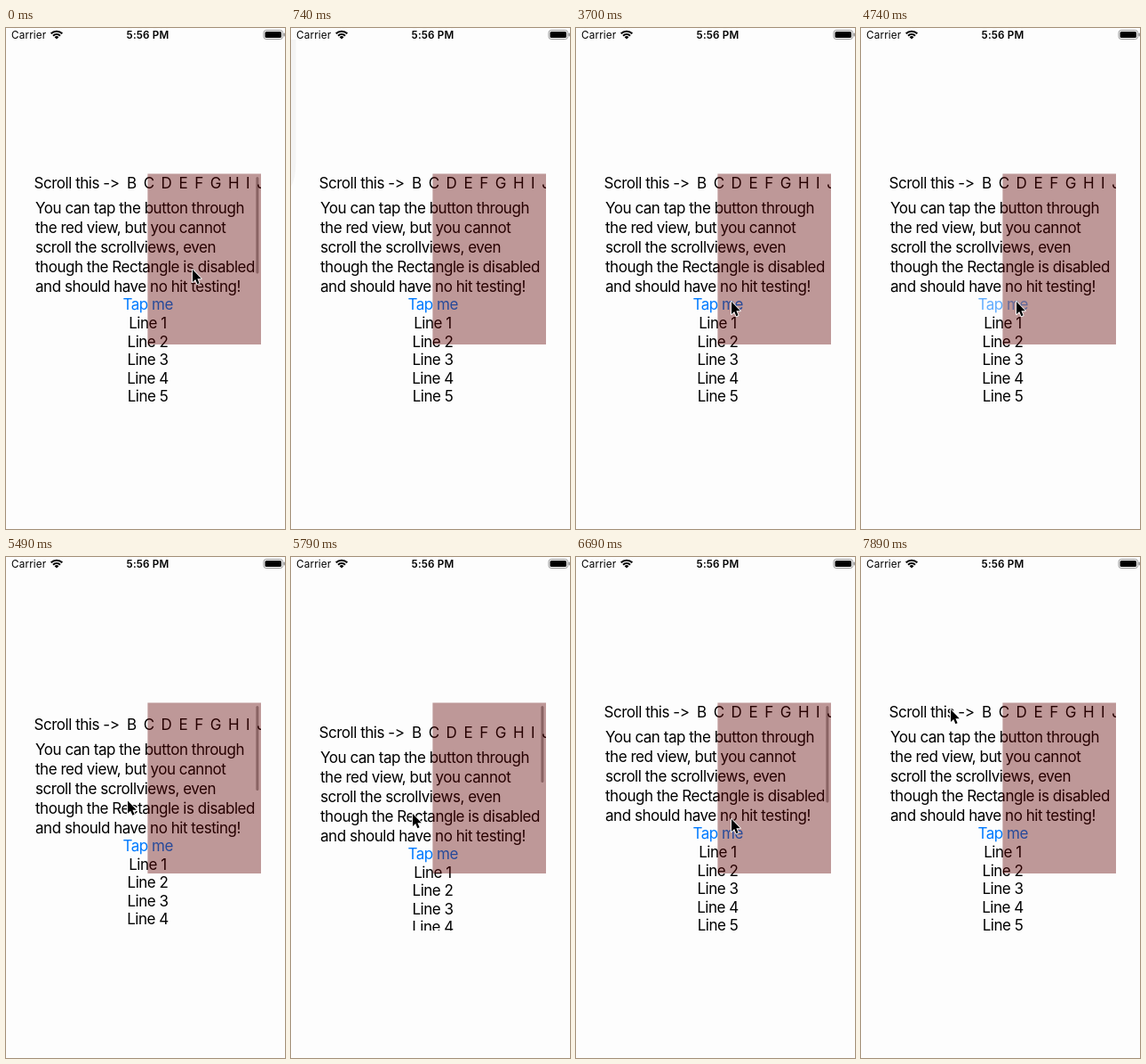
An HTML page with a canvas that plays this animation: 314x562 px, repeating every 8 s.

```html
<!DOCTYPE html>
<html lang="en">
<head>
<meta charset="utf-8">
<title>Hit testing demo</title>
<style>
html, body { margin: 0; width: 100%; height: 100%; overflow: hidden; background: #fdfdfd; }
canvas { display: block; width: 314px; height: 562px; }
</style>
</head>
<body>
<canvas id="stage"></canvas>
<script>
const W = 314, H = 562, LOOP = 8000;
const FONT = 'Inter, "Liberation Sans", sans-serif';
const canvas = document.getElementById('stage');
const ctx = canvas.getContext('2d');
const dpr = window.devicePixelRatio || 1;
canvas.width = W * dpr;
canvas.height = H * dpr;

const paragraph = [
  'You can tap the button through',
  'the red view, but you cannot',
  'scroll the scrollviews, even',
  'though the Rectangle is disabled',
  'and should have no hit testing!'
];

// Pointer moves; between them it rests
const moves = [
  { from: 0, to: 4, x: 169, y: 262 },
  { from: 4, to: 6, x: 21, y: 233 },
  { from: 6, to: 10, x: 137, y: 307 },
  { from: 18, to: 20, x: 175, y: 307 },
  { from: 29, to: 31, x: 137, y: 247 },
  { from: 31, to: 36, x: 137, y: 288 },
  { from: 36, to: 39, x: 175, y: 294 },
  { from: 44, to: 50, x: 101, y: 171 }
];

const ramp = (a, b, s) => Math.min(1, Math.max(0, (s - a) / (b - a)));
const smooth = k => k * k * (3 - 2 * k);

function stepAt(t) {
  if (t < 740) return Math.min(4, Math.floor(t / 150));
  if (t < 1340) return 5;
  if (t < 4890) return 6 + Math.min(23, Math.floor((t - 1340) / 146.6));
  return Math.min(50, 30 + Math.floor((t - 4890) / 150));
}

function pointerAt(s) {
  let x = 210, y = 271;
  for (const m of moves) {
    const k = smooth(ramp(m.from, m.to, s));
    x += (m.x - x) * k;
    y += (m.y - y) * k;
  }
  return [x, y];
}

const pullAt = s => 22.5 * ramp(31, 36, s) * (1 - ramp(36, 42, s));

const thumbAt = s => s < 6
  ? 1 - ramp(1, 4, s)
  : ramp(30, 32, s) * (1 - ramp(44, 48, s));

// Each tap dims the button, which then fades back
function tapAt(s) {
  if (s < 11 || s > 30) return 1;
  return 0.22 + 0.39 * Math.max(0, (s - 11) % 4 - 1);
}

function text(str, x, y, { size = 17, weight = 400, align = 'left', color = '#000', gap = -0.47 } = {}) {
  ctx.font = `${weight} ${size}px ${FONT}`;
  ctx.letterSpacing = gap + 'px';
  ctx.textAlign = align;
  ctx.fillStyle = color;
  ctx.fillText(str, x, y);
  return ctx.measureText(str).width;
}

function pill(x, y, w, h, r, color) {
  ctx.fillStyle = color;
  ctx.beginPath();
  ctx.roundRect(x, y, w, h, r);
  ctx.fill();
}

function wifi(x, y) {
  const from = -Math.PI * 0.75, to = -Math.PI * 0.25;
  ctx.strokeStyle = ctx.fillStyle = '#000';
  ctx.lineWidth = 2.1;
  for (const r of [5.6, 8.9]) {
    ctx.beginPath();
    ctx.arc(x, y, r, from, to);
    ctx.stroke();
  }
  ctx.beginPath();
  ctx.moveTo(x, y);
  ctx.arc(x, y, 3.4, from, to);
  ctx.fill();
}

function statusBar() {
  text('Carrier', 6, 12, { size: 11.7, gap: 0.15 });
  wifi(57, 12.6);
  text('5:56 PM', 159.5, 12, { size: 11.7, weight: 600, align: 'center', gap: 0.15 });
  ctx.strokeStyle = '#999';
  ctx.lineWidth = 1;
  ctx.beginPath();
  ctx.roundRect(290, 2.5, 21.5, 10, 2.8);
  ctx.stroke();
  pill(291.5, 4, 18.5, 7, 1.6, '#000');
  pill(312.5, 5.5, 1.5, 4, 0.7, '#999');
}

function content(dy, tapAlpha) {
  ctx.save();
  ctx.beginPath();
  ctx.rect(31, 164, 256, 255);
  ctx.clip();
  ctx.translate(0, dy);
  text('Scroll this ->', 31.5, 180);
  let x = 136;
  for (const c of 'BCDEFGHIJ') x += text(c, x, 180) + 8;
  paragraph.forEach((line, i) => text(line, 33, 208 + 22 * i));
  text('Tap me', 159.7, 316, { align: 'center', color: `rgba(0,122,255,${tapAlpha})` });
  for (let i = 0; i < 5; i++) {
    text('Line ' + (i + 1), 159.5, 337 + 20.5 * i, { align: 'center' });
  }
  ctx.restore();
}

function arrow(x, y) {
  ctx.save();
  ctx.translate(x, y);
  const shape = new Path2D('M0 0V14L3.2 11.1L5.4 16.2L7.6 15.3L5.4 10.3H9.8Z');
  ctx.lineJoin = 'round';
  ctx.lineWidth = 1.8;
  ctx.strokeStyle = '#fff';
  ctx.stroke(shape);
  ctx.fillStyle = '#000';
  ctx.fill(shape);
  ctx.restore();
}

function edgeShade() {
  ctx.fillStyle = '#f4f4f4';
  ctx.fill(new Path2D('M0 13H5.5V150Q5.5 168 0 178Z'));
}

function draw(t) {
  const s = stepAt(t);
  const away = s === 5;
  const dy = pullAt(s);

  ctx.setTransform(dpr, 0, 0, dpr, 0, 0);
  ctx.fillStyle = '#fdfdfd';
  ctx.fillRect(0, 0, W, H);
  if (away) edgeShade();
  statusBar();
  content(dy, tapAt(s));
  pill(281.4, 167, 3, 108.5 - dy, 1.5, `rgba(0,0,0,${0.35 * thumbAt(s)})`);
  ctx.fillStyle = 'rgba(96,0,0,0.4)';
  ctx.fillRect(159.4, 163.5, 127.6, 191.5);
  if (!away) arrow(...pointerAt(s));
}

const start = performance.now();
function frame() {
  draw((performance.now() - start) % LOOP);
  requestAnimationFrame(frame);
}
frame();
</script>
</body>
</html>
```
